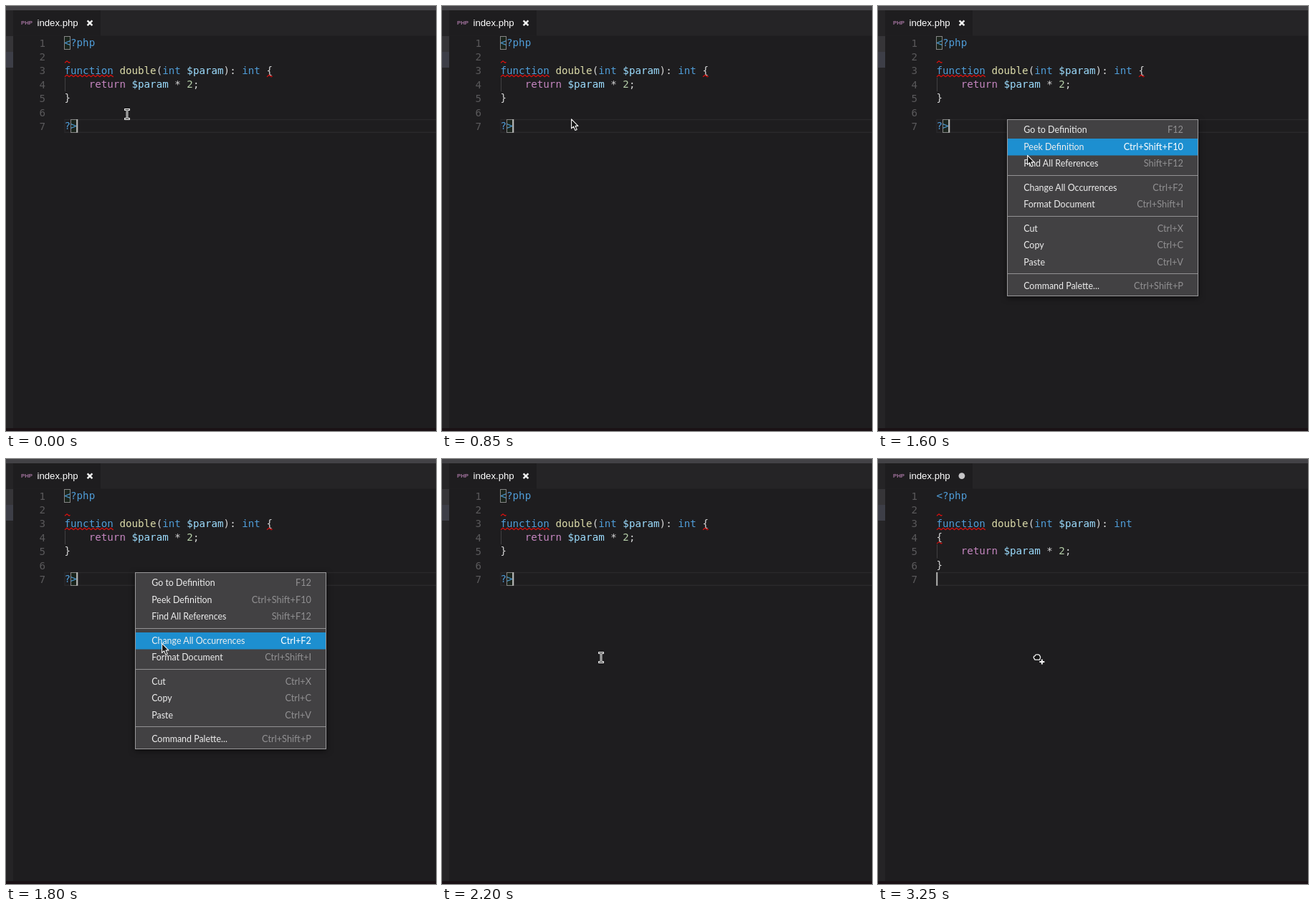
These frames come from a looping animation (600 by 593 pixels, 3.35 s). An HTML page:

```html
<!DOCTYPE html>
<html lang="en">
<head>
<meta charset="utf-8">
<title>Format document</title>
<style>
  html, body { margin: 0; width: 100%; height: 100%; overflow: hidden; background: #1e1d1f; }
  svg { display: block; width: 600px; height: 593px; }
  text { white-space: pre; }
  .code text { font: 14.2px "DejaVu Sans Mono", monospace; }
  .tab { font: 13.2px "Liberation Sans", Arial, sans-serif; fill: #fff; }
  .badge { font: bold 7.8px "Liberation Sans", Arial, sans-serif; fill: #a0719c; }
  .menu text { font: 12.45px Lato, sans-serif; fill: #eee; }
  .menu .keys { font-size: 12.8px; fill: #919092; text-anchor: end; }
  .menu .on rect { fill: #1d8fd0; }
  .menu .on .keys { fill: #fff; }
  .num { fill: #5a595b; }
  .key { fill: #4f9dd8; }
  .fn { fill: #dcdcaa; }
  .var { fill: #9cdcfe; }
  .ret { fill: #c586c0; }
  .lit { fill: #b5cea8; }
  .op { fill: #d4d4d4; }
  .wave { fill: none; stroke: #d8100f; stroke-width: 1.2; }
  .match { fill: rgba(0, 100, 0, .1); stroke: #858585; }
</style>
</head>
<body>
<svg id="stage" viewBox="0 0 600 593"></svg>
<script>
const LOOP = 3350;
const LEFT = 81.5, COL = 8.549, ROW = 19.4, TOP = 41.6;
const rowTop = n => TOP + (n - 1) * ROW;

const rect = (x, y, w, h, fill) =>
  `<rect x="${x}" y="${y}" width="${w}" height="${h}" fill="${fill}"/>`;

// A line is a list of "class:text" tokens.
function codeLine(n, col, tokens) {
  const spans = tokens.map(token => {
    const i = token.indexOf(":");
    const text = token.slice(i + 1).replace(/</g, "&lt;").replace(/>/g, "&gt;");
    return `<tspan class="${token.slice(0, i)}">${text}</tspan>`;
  });
  return `<text x="${LEFT + col * COL}" y="${rowTop(n) + 14.1}">${spans.join("")}</text>`;
}

function wave(n, col, count) {
  const x = LEFT + col * COL + .5, end = x + count * COL - 1, y = rowTop(n) + 18.3;
  let d = `M${x} ${y}`;
  for (let i = 1; x + i * 3.06 <= end; i++) d += ` L${x + i * 3.06} ${y - (i % 2) * 2.5}`;
  return `<path class="wave" stroke-linejoin="round" d="${d} L${end} ${y - 1}"/>`;
}

const matchBox = (n, col) =>
  `<rect class="match" x="${Math.floor(LEFT + col * COL) + .5}" y="${Math.round(rowTop(n)) + .5}" width="8" height="18"/>`;
const guide = n => rect(82, rowTop(n), 1, ROW, "#414042");
const caret = col => rect(LEFT + col * COL - .2, 158, 1.9, 18.8, "#b8b9b7");

const openTag = codeLine(1, 0, ["key:<?php"]);
const signature = ["key:function", "op: ", "fn:double", "op:(", "key:int", "op: ",
  "var:$param", "op:): ", "key:int"];
const body = n => guide(n) +
  codeLine(n, 4, ["ret:return", "op: ", "var:$param", "op: * ", "lit:2", "op:;"]);
const sharedWaves = wave(2, 0, 1) + wave(3, 0, 8);

const before = matchBox(1, 0) + matchBox(7, 1) + openTag +
  codeLine(3, 0, [...signature, "op: {"]) + body(4) + codeLine(5, 0, ["op:}"]) +
  codeLine(7, 0, ["key:?>"]) + sharedWaves + wave(3, 33, 1) + caret(2);

const after = openTag + codeLine(3, 0, signature) + codeLine(4, 0, ["op:{"]) + body(5) +
  codeLine(6, 0, ["op:}"]) + sharedWaves + wave(4, 0, 1) + caret(0);

const numbers = [1, 2, 3, 4, 5, 6, 7].map(n =>
  `<text class="num" x="46.6" y="${rowTop(n) + 15}">${n}</text>`).join("");

const chrome =
  rect(0, 0, 600, 593, "#1e1d1f") +
  rect(0, 0, 10, 593, "#252426") +
  rect(0, 42, 10, 22, "#363538") +
  rect(0, 64, 10, 22, "#3d3e47") +
  rect(10, 6, 590, 35.5, "#252426") +
  rect(10, 6, 122, 35.5, "#1e1d1f") +
  rect(0, 0, 600, 6, "#434246") +
  rect(0, 589, 600, 4, "#1a1115") +
  `<text class="badge" x="21" y="26">PHP</text>
   <text class="tab" x="43.5" y="28">index.php</text>
   <rect x="82" y="158.5" width="530" height="17.8" fill="none" stroke="#2a292b" stroke-width="1.4"/>`;

const items = [
  [172.5, "Go to Definition", "F12"],
  [196.2, "Peek Definition", "Ctrl+Shift+F10"],
  [219.8, "Find All References", "Shift+F12"],
  [253, "Change All Occurrences", "Ctrl+F2"],
  [276.7, "Format Document", "Ctrl+Shift+I"],
  [310, "Cut", "Ctrl+X"],
  [333.6, "Copy", "Ctrl+C"],
  [357.2, "Paste", "Ctrl+V"],
  [390.4, "Command Palette...", "Ctrl+Shift+P"]
];
const menu =
  `<rect x="180.5" y="158.5" width="266" height="246" fill="#424143" stroke="#99989a"
     style="filter:drop-shadow(0 2px 4px rgba(0,0,0,.55))"/>` +
  [236, 293, 373].map(y => rect(181, y, 265, 1, "#929193")).join("") +
  items.map(([y, label, keys]) =>
    `<g class="item">${rect(181, Math.round(y - 11.3), 265, 23.5, "none")}
     <text x="203.2" y="${y + 4.5}">${label}</text>
     <text class="keys" x="426" y="${y + 4.5}">${keys}</text></g>`).join("");

// Pointer shapes are drawn around their hot spot.
const pointers = `
  <g id="beam" fill="none" stroke-linecap="square">
    <path d="M-2.5 -6.5H2.5M0 -6.5V6.5M-2.5 6.5H2.5" stroke="#f4f4f4" stroke-width="2.8"/>
    <path d="M-2.5 -6.5H2.5M0 -6.5V6.5M-2.5 6.5H2.5" stroke="#1a1a1a" stroke-width=".8"/>
  </g>
  <path id="arrow" d="M-.4 .3V13.4L2.6 10.7L4.8 15.9L7.2 14.9L5 9.9H8.9Z"
    fill="#141414" stroke="#f4f4f4" stroke-width="1.1" stroke-linejoin="round"/>
  <g id="grab" stroke="#f4f4f4" fill="none">
    <path d="M-3 3.2L-4.7 .3Q-5.2 -2 -3 -2.2Q-2.4 -4.5 .2 -4.1Q3.4 -4.6 4 -2Q5.2 -.6 4.2 1.2L3.4 3.2Z"
      fill="#141414" stroke-width="1.3" stroke-linejoin="round"/>
    <path d="M3.3 6H10.3M6.8 2.5V9.5" stroke-width="2"/>
  </g>`;

document.getElementById("stage").innerHTML = `${chrome}
  <path id="close" d="M113.6 20.4L120.4 27.2M120.4 20.4L113.6 27.2" stroke="#f2f2f2" stroke-width="2.5"/>
  <circle id="dirty" cx="116.9" cy="23.6" r="4.4" fill="#c6c5c7"/>
  <g class="code">${numbers}<g id="before">${before}</g><g id="after">${after}</g></g>
  <g id="menu" class="menu">${menu}</g>
  <g id="pointer">${pointers}</g>`;

const $ = id => document.getElementById(id);
const rows = [...document.querySelectorAll(".item")];
const show = (id, on) => $(id).style.display = on ? "" : "none";

const MENU_OPEN = 950, MENU_CLOSE = 2200, FORMATTED = 2350;
const path = [
  [0, 169, 151], [50, 169, 151], [550, 181, 157.5], [1150, 181, 157.5],
  [1600, 209, 208], [1650, 210, 212], [1750, 215, 240], [1800, 218, 257],
  [1950, 222, 277], [LOOP, 222, 277]
];
const hover = [[0, -1], [1250, 0], [1500, 1], [1650, 2], [1750, 3], [1850, 4]];
const shapes = [[0, "beam"], [800, "arrow"], [MENU_CLOSE, "beam"], [3200, "grab"]];

const stepAt = (table, t) => table.filter(step => step[0] <= t).pop()[1];

function pointAt(t) {
  const i = path.findIndex(p => p[0] > t);
  const [t0, x0, y0] = path[i - 1], [t1, x1, y1] = path[i];
  const k = (t - t0) / (t1 - t0);
  return [x0 + (x1 - x0) * k, y0 + (y1 - y0) * k];
}

function draw(now) {
  const t = Math.floor(now % LOOP / 50) * 50;
  const done = t >= FORMATTED;
  show("before", !done);
  show("after", done);
  show("close", !done);
  show("dirty", done);
  show("menu", t >= MENU_OPEN && t < MENU_CLOSE);
  const active = stepAt(hover, t), shape = stepAt(shapes, t);
  rows.forEach((row, i) => row.classList.toggle("on", i === active));
  for (const id of ["beam", "arrow", "grab"]) show(id, id === shape);
  $("pointer").setAttribute("transform", `translate(${pointAt(t)})`);
}

const start = performance.now();
function tick() {
  draw(performance.now() - start);
  requestAnimationFrame(tick);
}
tick();
</script>
</body>
</html>
```
